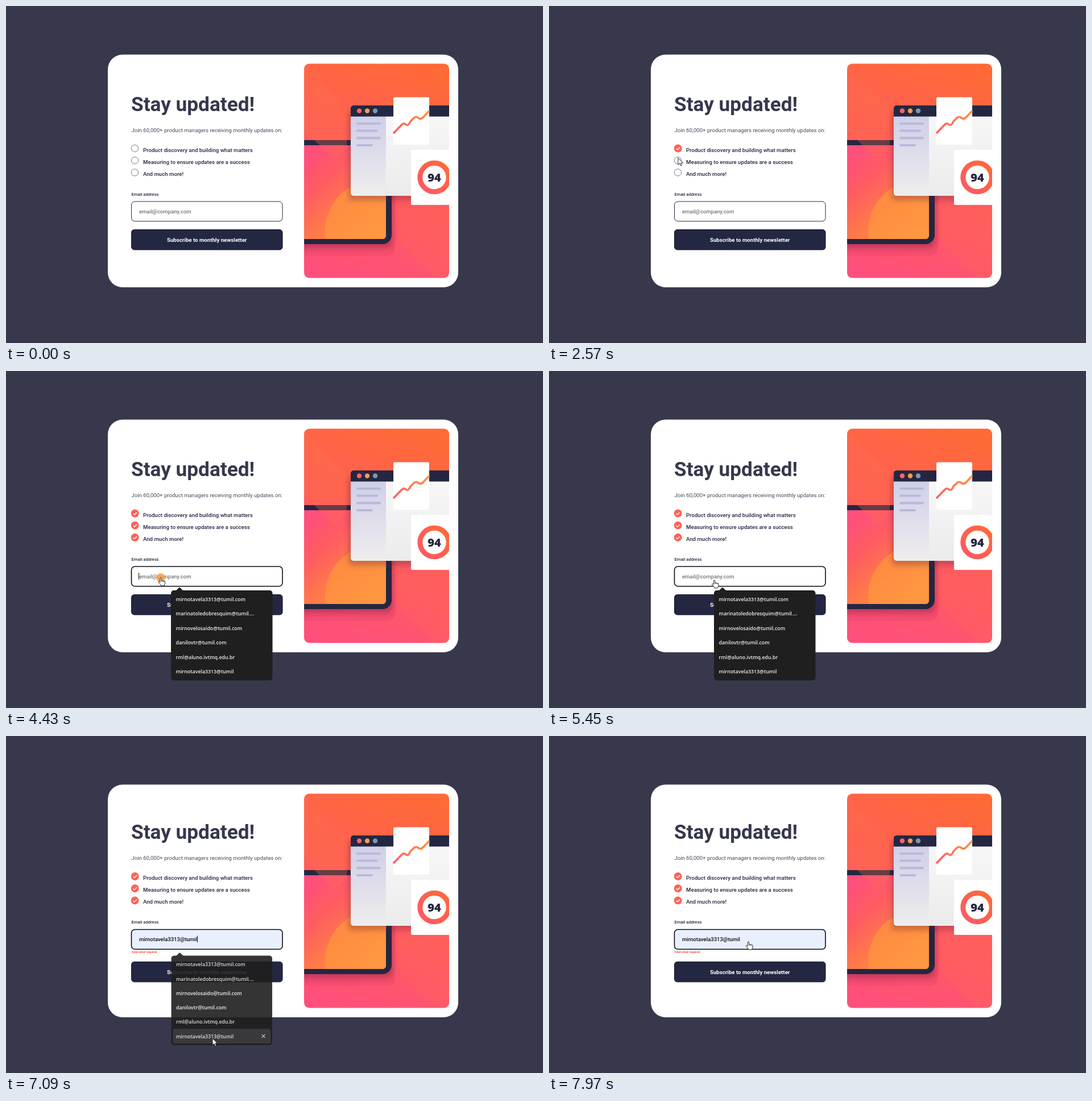
Write an HTML page that moves like this. It is 944 px wide and 593 px high and loops after 8 s.

```html
<!DOCTYPE html>
<html lang="en">
<head>
<meta charset="utf-8">
<title>Newsletter sign-up</title>
<style>
  html, body { margin: 0; width: 100%; height: 100%; overflow: hidden; background: #38384d; }
  svg { display: block; width: 944px; height: 593px; }
  text { font-family: Roboto, sans-serif; fill: #242742; white-space: pre; }
  .title { font-size: 35.2px; font-weight: 700; fill: #36384d; }
  .lead { font-size: 9.6px; fill: #46485c; }
  .item, .send { font-size: 9.67px; font-weight: 500; }
  .send { fill: #fff; font-weight: 700; }
  .label { font-size: 7.6px; font-weight: 500; }
  .value { font-size: 9.5px; font-weight: 500; }
  .preview { font: 8.5px "Liberation Sans", Arial, sans-serif; }
  .error { font-size: 5px; font-weight: 700; fill: #ff5a3c; }
  .option { font: 600 8.8px "Open Sans", sans-serif; fill: #f0f0f0; }
  .score { font: 800 20px "Open Sans", sans-serif; }
</style>
</head>
<body>
<svg viewBox="0 0 944 593">
  <defs>
    <linearGradient id="back" gradientUnits="userSpaceOnUse" x1="735" y1="101" x2="570" y2="478">
      <stop offset="0" stop-color="#ff6a36"/><stop offset=".55" stop-color="#ff5c5e"/><stop offset="1" stop-color="#ff4f7c"/>
    </linearGradient>
    <linearGradient id="screen" gradientUnits="userSpaceOnUse" x1="530" y1="265" x2="608" y2="352">
      <stop offset="0" stop-color="#ff4f7c"/><stop offset=".45" stop-color="#ff5c61"/><stop offset="1" stop-color="#ff7d47"/>
    </linearGradient>
    <linearGradient id="sun" x1="0" y1="0" x2="1" y2="1">
      <stop offset="0" stop-color="#ff8642"/><stop offset=".5" stop-color="#ff9740"/>
    </linearGradient>
    <linearGradient id="side" x1="0" y1="0" x2="0" y2="1">
      <stop offset="0" stop-color="#cfcfe8"/><stop offset="1" stop-color="#efeded"/>
    </linearGradient>
    <linearGradient id="pane" x1="0" y1="0" x2="0" y2="1">
      <stop offset="0" stop-color="#f7f7f7"/><stop offset="1" stop-color="#ebebeb"/>
    </linearGradient>
    <linearGradient id="warm" x1="1" y1="0" x2="0" y2="1">
      <stop offset="0" stop-color="#ff6a36"/><stop offset="1" stop-color="#ff5768"/>
    </linearGradient>
    <linearGradient id="trend" x1="1" y1="0" x2="0" y2="1">
      <stop offset="0" stop-color="#ff9440"/><stop offset="1" stop-color="#ff5a64"/>
    </linearGradient>
    <filter id="soft" x="-30%" y="-30%" width="160%" height="160%"><feGaussianBlur stdDeviation="5"/></filter>
    <clipPath id="frame"><rect x="524" y="101.500" width="255" height="377" rx="9"/></clipPath>
    <clipPath id="glass"><path d="M524 245H668V404a6 6 0 0 1-6 6H524z"/></clipPath>
  </defs>

  <rect width="944" height="593" fill="#38384d"/>
  <rect x="179" y="85.500" width="616" height="409.500" rx="26" fill="#fff"/>

  <g clip-path="url(#frame)">
    <rect x="524" y="101" width="255" height="378" fill="url(#back)"/>
    <path d="M779 356H700q-12 0-12 12V412L754 478H779z" fill="#ff6a50" opacity=".25"/>
    <path d="M500 236H684V424q0 16-16 16H500z" fill="#c92f58" opacity=".16"/>
    <path d="M500 260H680V412q0 14-14 14H500z" fill="#6b1538" opacity=".35" filter="url(#soft)"/>
    <path d="M500 236H678V403a16 16 0 0 1-16 16H500z" fill="#242742"/>
    <g clip-path="url(#glass)">
      <rect x="524" y="245" width="144" height="165" fill="url(#screen)"/>
      <circle cx="651" cy="396" r="90" fill="url(#sun)"/>
    </g>
    <path d="M524 218L570 264q7 7 14 0L599 249V180L524 105z" fill="#ff6f4c" opacity=".3"/>
    <rect x="602" y="184" width="190" height="158" rx="6" fill="#5a1c38" opacity=".3" filter="url(#soft)"/>
    <path d="M606 194H668V334H611a5 5 0 0 1-5-5z" fill="url(#side)"/>
    <rect x="668" y="194" width="112" height="140" fill="url(#pane)"/>
    <path d="M606 194.500V180a5 5 0 0 1 5-5H780V194.500z" fill="#242742"/>
    <circle cx="621" cy="184.500" r="4.200" fill="#ff6468"/>
    <circle cx="635" cy="184.500" r="4.200" fill="#ff9a4a"/>
    <circle cx="649" cy="184.500" r="4.200" fill="#7d98ac"/>
    <path d="M618 207H657M618 219.500H652M618 232.300H657M618 245H643" stroke="#b9b9dc" stroke-width="4.200" stroke-linecap="round"/>
    <rect x="681" y="160.500" width="63" height="83.500" rx="2" fill="#fff"/>
    <path d="M681 224L695 209.500Q699 205 703 208.500T711 203L717 197Q720.500 193.500 725 197T734 195L744 184.500" fill="none" stroke="url(#trend)" stroke-width="3.600"/>
    <rect x="712" y="253" width="70" height="97" rx="2" fill="#fff"/>
    <circle cx="753" cy="301.500" r="25.200" fill="none" stroke="url(#warm)" stroke-width="9"/>
    <text class="score" x="753" y="308.500" text-anchor="middle">94</text>
  </g>

  <g id="form">
    <text class="title" x="220" y="184.500">Stay updated!</text>
    <text class="lead" x="220.500" y="221.800">Join 60,000+ product managers receiving monthly updates on:</text>
    <g id="list"></g>
    <text class="label" x="220.500" y="333.500">Email address</text>
    <rect id="field" x="220.500" y="344" width="265.500" height="34.800" rx="6" fill="#fff" stroke="#242742"/>
    <text id="value" x="234" y="364.700"></text>
    <rect id="caret" y="355" width="1" height="12" fill="#111"/>
    <text class="error" id="error" x="220.500" y="385.500">Valid email required</text>
  </g>
  <g id="button">
    <rect x="220.500" y="393.500" width="265.500" height="35.500" rx="5" fill="#242742" stroke="#15172c"/>
    <text class="send" x="353.200" y="414.800" text-anchor="middle">Subscribe to monthly newsletter</text>
  </g>

  <g id="menu">
    <path d="M298.500 386.500L305 380.500L311.500 386.500z" fill="#1f1f1f"/>
    <rect x="290" y="386" width="178.500" height="158.500" rx="5" fill="#1f1f1f"/>
    <g id="hover">
      <rect x="293" y="-13" width="173" height="26" rx="3" fill="#3a3a3a"/>
      <path d="M450-3l6 6m0-6l-6 6" stroke="#ddd" stroke-width="1.100"/>
    </g>
    <g id="options"></g>
  </g>

  <circle id="press" r="8" fill="#f7983a" opacity=".78"/>
  <g id="pointer" stroke="#111" stroke-width=".9" stroke-linejoin="round" fill="#fff">
    <path id="arrow" d="M0 0V12L2.800 9.400L4.700 13.700L6.700 12.800L4.900 8.700H8.700z"/>
    <g id="hand">
      <path d="M-1.200 1.200a1.200 1.200 0 0 1 2.400 0V4.800q1.400-.7 2.300.4q1.400-.5 2.200.5q1.900-.3 1.900 1.600V10.200L6.300 12.200V14H.4V12.700L-3.800 8.300q-.8-1.300.3-1.800q1-.3 2.300 1.300z"/>
      <path d="M1.200 4.800V7M3.500 5.200V7.200M5.700 5.700V7.400" fill="none" stroke-width=".7"/>
    </g>
  </g>
</svg>
<script>
const LOOP = 8000;
const $ = id => document.getElementById(id);
const show = (el, on) => el.setAttribute('visibility', on ? 'visible' : 'hidden');
const move = (el, x, y) => el.setAttribute('transform', `translate(${x} ${y})`);

const items = ['Product discovery and building what matters', 'Measuring to ensure updates are a success', 'And much more!'];
const mails = ['mirnotavela3313@tumil.com', 'marinatoledobresquim@tumil.com', 'mirnovelosaido@tumil.com',
  'danilovtr@tumil.com', 'rml@aluno.ivtmq.edu.br', 'mirnotavela3313@tumil'];
const clicks = [[1890, 225, 250], [2710, 228, 273], [3390, 227, 289], [4330, 272, 364]];
const FOCUS = 4400, PICK = 7020, BLINK = 530, ROW = 25.4;
const rowY = i => 401.600 + i * ROW;

// time, x, y, 1 = eased arrival
const path = [
  [390, 868, 580], [1150, 257, 260, 1], [1360, 221, 244, 1], [1630, 225, 250, 1], [2030, 225, 250],
  [2640, 227, 268, 1], [2710, 228, 273], [2860, 228, 273], [3190, 227, 289, 1], [3460, 227, 289],
  [3600, 231, 295], [4150, 268, 366, 1], [4290, 272, 364], [4770, 272, 364], [5520, 291, 368, 1],
  [6010, 350, 484], [6360, 363, 532], [7100, 363, 532], [7770, 360, 367, 1], [7880, 360, 367], [7970, 350.500, 362]
];

$('list').innerHTML = items.map((s, i) => {
  const y = 250.500 + i * 21.200;
  return `<circle cx="226.500" cy="${y}" r="6.100" fill="#fff" stroke="#55566a" stroke-width=".8"/>
    <g class="tick"><circle cx="226.700" cy="${y}" r="6.900" fill="#ff6155"/>
    <path d="M223.600 ${y + .3}l2.200 2.200l4.200-4.200" fill="none" stroke="#fff" stroke-width="1.400"/></g>
    <text class="item" x="241" y="${y + 6}">${s}</text>`;
}).join('');
$('options').innerHTML = mails.map((s, i) =>
  `<text class="option" x="298.500" y="${rowY(i) + 3.400}">${i === 1 ? s.replace('.com', '....') : s}</text>`).join('');
const ticks = document.querySelectorAll('.tick');

function pointerAt(t) {
  const i = path.findIndex(k => k[0] > t);
  if (i < 0) return path[path.length - 1].slice(1, 3);
  if (i === 0) return path[0].slice(1, 3);
  const [t0, x0, y0] = path[i - 1], [t1, x1, y1, eased] = path[i];
  let p = (t - t0) / (t1 - t0);
  if (eased) p = p * p * (3 - 2 * p);
  return [x0 + (x1 - x0) * p, y0 + (y1 - y0) * p];
}

function setValue(text, cls, fill) {
  const el = $('value');
  el.textContent = text;
  el.setAttribute('class', cls);
  el.style.fill = fill;
}

function draw(t) {
  const [x, y] = pointerAt(t);
  const focused = t >= FOCUS, picked = t >= PICK;
  const open = focused && t < 7235;
  const row = open && y > 389 ? Math.min(5, Math.floor((y - 389) / ROW)) : -1;

  ticks.forEach((el, i) => show(el, t >= clicks[i][0]));
  move($('form'), 0, picked ? -3.500 : 0);
  move($('button'), 0, picked ? 3.800 : 0);
  show($('error'), picked);

  const field = $('field');
  field.setAttribute('fill', picked || row >= 0 ? '#e8f0fe' : '#fff');
  field.setAttribute('stroke', focused ? '#0c0c12' : '#242742');
  field.setAttribute('stroke-width', focused ? 1.600 : 1);
  if (picked) setValue(mails[5], 'value', '#0b0b10');
  else if (row >= 0) setValue(mails[row], 'preview', '#111');
  else setValue('email@company.com', 'value', '#757575');

  const since = t - (picked ? PICK : FOCUS);
  show($('caret'), focused && Math.floor(since / BLINK) % 2 === 0);
  $('caret').setAttribute('x', picked ? 234 + $('value').getComputedTextLength() : 233);

  const fade = Math.min(1, Math.max(0, (t - 7075) / 160));
  const scale = 1 - fade * .06;
  show($('menu'), open);
  $('menu').setAttribute('opacity', 1 - fade);
  $('menu').setAttribute('transform', `translate(379 465) scale(${scale}) translate(-379 -465)`);
  $('hover').setAttribute('display', row >= 0 ? 'inline' : 'none');
  if (row >= 0) move($('hover'), 0, rowY(row));

  const press = clicks.find(c => t >= c[0] && t < c[0] + 170);
  show($('press'), press);
  if (press) move($('press'), press[1], press[2]);

  const overX = x > 220 && x < 486;
  const overField = y > 341 && y < 379, overButton = y > 393 && y < 433;
  const hand = overX && (overField || overButton) && row < 0;
  $('pointer').setAttribute('display', t < 390 ? 'none' : 'inline');
  move($('pointer'), x, y);
  $('arrow').setAttribute('display', hand ? 'none' : 'inline');
  $('hand').setAttribute('display', hand ? 'inline' : 'none');
}

const start = performance.now();
function tick() {
  draw((performance.now() - start) % LOOP);
  requestAnimationFrame(tick);
}
tick();
</script>
</body>
</html>
```
